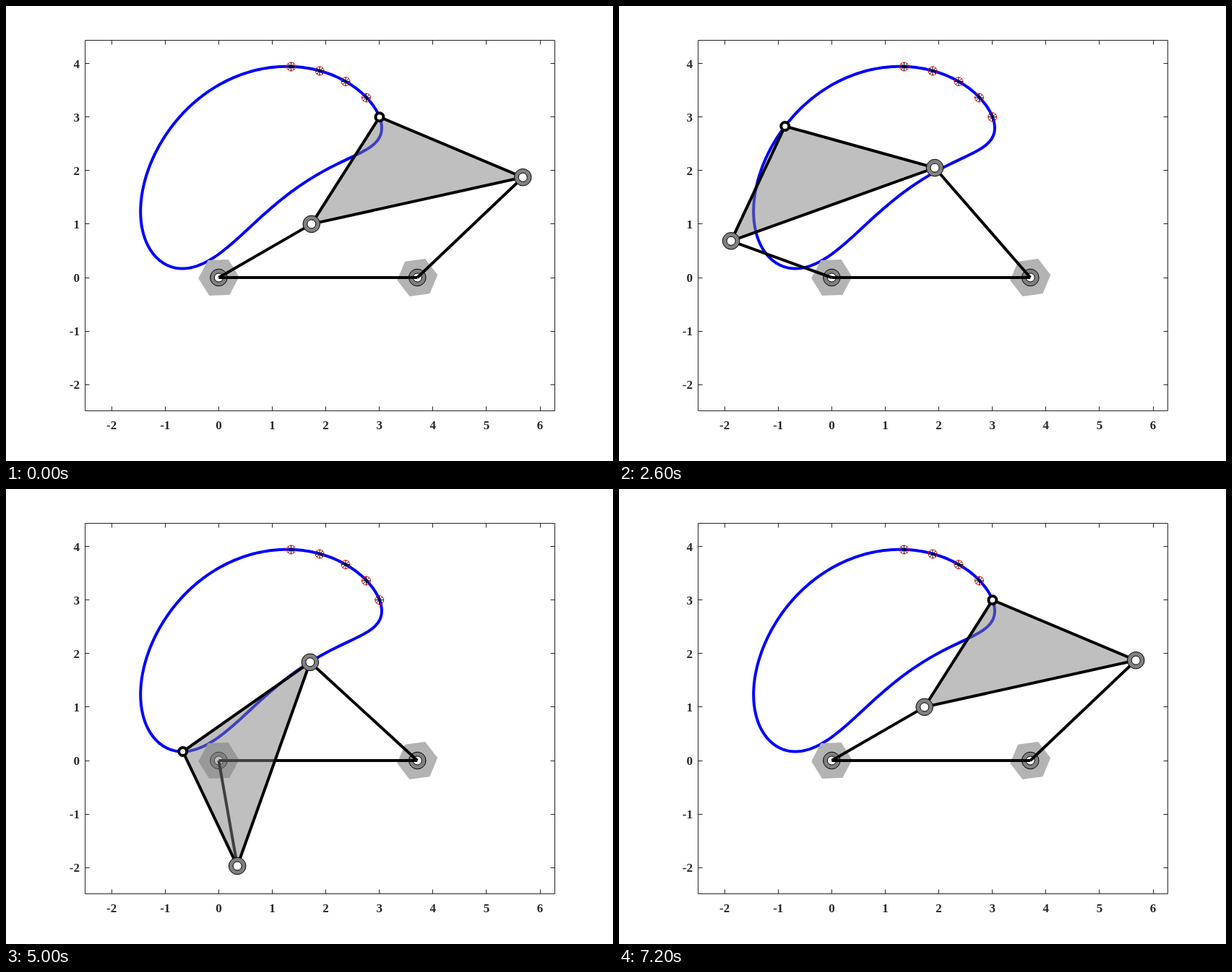
Animation, 840 px wide and 630 px high, one loop 7300 ms. Source, as an HTML page:

```html
<!DOCTYPE html>
<html lang="en">
<head>
<meta charset="utf-8">
<title>Four-bar linkage</title>
<style>
  html, body { margin: 0; width: 100%; height: 100%; overflow: hidden; background: #fff; }
  svg { display: block; width: 840px; height: 630px; }
  text { font: bold 17px "Liberation Serif", "Times New Roman", serif; fill: #262626; }
  .axis { fill: none; stroke: #262626; stroke-width: 1; }
  .curve { fill: none; stroke: #00f; stroke-width: 4; stroke-linejoin: round; }
  .base { fill: #b3b3b3; }
  .bar { fill: none; stroke: #000; stroke-width: 4; }
  .plate { fill: #808080; fill-opacity: .5; }
  .ring { fill: #808080; stroke: #000; }
  .hole { fill: #fff; stroke: #000; }
  .tip { fill: #fff; stroke: #000; stroke-width: 4; }
  .goal { fill: none; stroke: #f00; }
  .star { fill: none; stroke: #000; }
</style>
</head>
<body>
<svg id="stage" viewBox="0 0 840 630"></svg>
<script>
const stage = document.getElementById('stage');
const UNIT = 74.11, OX = 294.4, OY = 376;
const CRANK = 2, COUPLER = 4.042, ROCKER = 2.718;
const TIP_ALONG = 1.672, TIP_ACROSS = 1.677;
const O = [0, 0], D = [3.709, 0];
const STEP = 100, STEPS = 73;
const rad = deg => deg * Math.PI / 180;
const px = ([x, y]) => [OX + x * UNIT, OY - y * UNIT];

function add(tag, attrs, parent = stage) {
  const el = document.createElementNS('http://www.w3.org/2000/svg', tag);
  for (const k in attrs) el.setAttribute(k, attrs[k]);
  return parent.appendChild(el);
}
const pathOf = (pts, close) =>
  'M' + pts.map(p => px(p).map(v => v.toFixed(2)).join()).join('L') + (close ? 'Z' : '');
const place = (el, p) => el.setAttribute('transform', `translate(${px(p)})`);

// Positions of crank pin, rocker pin and coupler point at a crank angle
function solve(deg) {
  const A = [CRANK * Math.cos(rad(deg)), CRANK * Math.sin(rad(deg))];
  const ex = D[0] - A[0], ey = D[1] - A[1], d = Math.hypot(ex, ey);
  const along = (COUPLER ** 2 - ROCKER ** 2 + d * d) / (2 * d);
  const h = Math.sqrt(COUPLER ** 2 - along ** 2);
  const ux = (ex * along - ey * h) / (d * COUPLER);
  const uy = (ey * along + ex * h) / (d * COUPLER);
  const off = (a, b) => [A[0] + a * ux - b * uy, A[1] + a * uy + b * ux];
  return { A, B: off(COUPLER, 0), P: off(TIP_ALONG, TIP_ACROSS) };
}

function joint(p) {
  const g = add('g', {});
  add('circle', { r: 11.8, class: 'ring' }, g);
  add('circle', { r: 6, class: 'hole' }, g);
  if (p) place(g, p);
  return g;
}

function hexagon(p, turn) {
  const [cx, cy] = px(p);
  const pts = Array.from({ length: 6 }, (_, i) => {
    const a = rad(turn + 60 * i);
    return [cx + 28.2 * Math.cos(a), cy - 28.2 * Math.sin(a)];
  });
  add('polygon', { points: pts.join(' '), class: 'base' });
}

function axes() {
  const L = 109.5, R = 759.5, T = 47.5, B = 560.5, len = 6;
  let d = `M${L} ${T}H${R}V${B}H${L}Z`;
  const snap = v => Math.floor(v) + .5;
  for (let i = -2; i <= 6; i++) {
    const x = px([i, 0])[0], s = snap(x);
    d += `M${s} ${B}v${-len}M${s} ${T}v${len}`;
    add('text', { x, y: 586, 'text-anchor': 'middle' }).textContent = i;
  }
  for (let i = -2; i <= 4; i++) {
    const y = px([0, i])[1], s = snap(y);
    d += `M${L} ${s}h${len}M${R} ${s}h${-len}`;
    add('text', { x: 102, y: y + 6, 'text-anchor': 'end' }).textContent = i;
  }
  add('path', { d, class: 'axis' });
}

function marker(p) {
  const g = add('g', {});
  add('circle', { r: 6, class: 'goal' }, g);
  add('path', { d: 'M-6 0H6M0-6V6M-4.2-4.2L4.2 4.2M-4.2 4.2L4.2-4.2', class: 'star' }, g);
  place(g, p);
}

axes();
const trace = Array.from({ length: 360 }, (_, i) => solve(i).P);
add('path', { d: pathOf(trace, true), class: 'curve' });
hexagon(O, 2);
hexagon(D, 7.5);
[[3, 3], [2.754, 3.36], [2.37, 3.662], [1.885, 3.86], [1.351, 3.94]].forEach(marker);
joint(O);
joint(D);
add('path', { d: pathOf([O, D]), class: 'bar' });
const crank = add('path', { class: 'bar' });
const rocker = add('path', { class: 'bar' });
const plate = add('path', { class: 'plate' });
const edges = add('path', { class: 'bar' });
const pinA = joint(), pinB = joint();
const tip = add('circle', { r: 5.5, class: 'tip' });

function draw(step) {
  const { A, B, P } = solve(30 + 5 * step);
  const tri = pathOf([A, B, P], true);
  crank.setAttribute('d', pathOf([O, A]));
  rocker.setAttribute('d', pathOf([D, B]));
  plate.setAttribute('d', tri);
  edges.setAttribute('d', tri);
  place(pinA, A);
  place(pinB, B);
  place(tip, P);
}

const start = performance.now();
function tick(now) {
  draw(Math.floor(Math.max(0, now - start) / STEP) % STEPS);
  requestAnimationFrame(tick);
}
draw(0);
requestAnimationFrame(tick);
</script>
</body>
</html>
```
